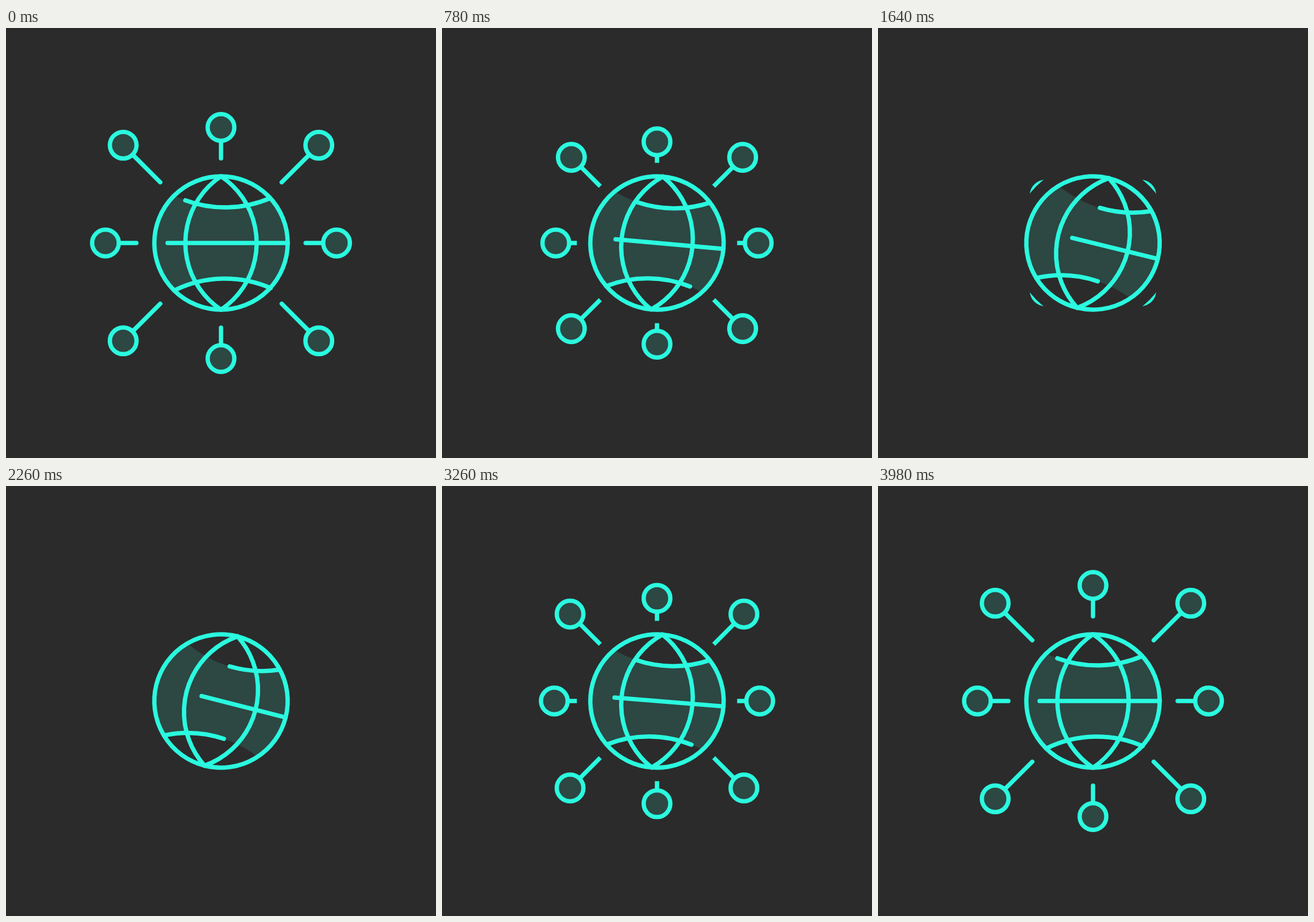
Write an HTML page with a canvas that moves like this. It is 748 px wide and 748 px high and loops after 4 s.

```html
<!DOCTYPE html>
<html lang="en">
<head>
<meta charset="utf-8">
<title>Network globe</title>
<style>
html, body { margin: 0; height: 100%; overflow: hidden; background: #2b2b2b; }
canvas { display: block; }
</style>
</head>
<body>
<canvas width="748" height="748"></canvas>
<script>
const ctx = document.querySelector('canvas').getContext('2d');
const BG = '#2b2b2b', LINE = '#2afadf', FILL = '#2d4743';
const LOOP = 4000, GLOBE = 116, GAP = 139.5, NODE = 23.2;
const rad = deg => deg * Math.PI / 180;

function circle(x, y, r) {
  ctx.beginPath();
  ctx.arc(x, y, r, 0, 7);
}

// Parallels: angles are measured from the arc's middle, positive to the right
const northArc = (right, left) => ctx.arc(7, -262, 200, rad(90 - right), rad(90 - left));
const southArc = (left, right) => ctx.arc(7, 262, 200, rad(left - 90), rad(right - 90));

function stroke(path) {
  ctx.beginPath();
  path();
  ctx.stroke();
}

function segment(x1, x2) {
  stroke(() => {
    ctx.moveTo(x1, 0);
    ctx.lineTo(x2, 0);
  });
}

function drawNodes(u) {
  const pull = u * u * (165 - 22 * u ** 3) / 201;
  ctx.save();
  // Hide everything close to the globe
  ctx.beginPath();
  ctx.rect(-374, -374, 748, 748);
  ctx.arc(0, 0, GAP, 0, 2 * Math.PI);
  ctx.clip('evenodd');
  for (let i = 0; i < 8; i++) {
    const home = i % 2 ? 240.6 : 201;
    const tip = i % 2 ? 149.4 : 147.2;
    const shift = home * pull;
    ctx.save();
    ctx.rotate(i * Math.PI / 4);
    ctx.translate(-shift, 0);
    segment(tip, home - NODE);
    circle(home, 0, NODE);
    ctx.fill();
    ctx.stroke();
    ctx.restore();
  }
  ctx.restore();
}

function drawGlobe(u) {
  const s = u * u * (3 - 2 * u);
  ctx.save();
  ctx.rotate(rad(15 * s));

  ctx.save();
  circle(0, 0, GLOBE);
  ctx.clip();
  ctx.beginPath();
  northArc(40, -40);
  southArc(-40, 40);
  ctx.fill();
  ctx.restore();

  stroke(() => northArc(23.1, -20.2 + 19 * s));
  stroke(() => southArc(-26.2, 23.4 - 20.3 * s));
  segment(-93 + 61 * s, GLOBE);

  const half = Math.asin(GLOBE / 139.5);
  stroke(() => ctx.arc(-77.5, 0, 139.5, -half, half));
  stroke(() => ctx.arc(77.5, 0, 139.5, Math.PI - half, Math.PI + half));
  circle(0, 0, GLOBE);
  ctx.stroke();
  ctx.restore();
}

function draw() {
  const u = 1 - Math.abs(1 - performance.now() % LOOP / (LOOP / 2));
  ctx.setTransform(1, 0, 0, 1, 0, 0);
  ctx.fillStyle = BG;
  ctx.fillRect(0, 0, 748, 748);
  ctx.translate(374, 374);
  ctx.fillStyle = FILL;
  ctx.strokeStyle = LINE;
  ctx.lineWidth = 7.5;
  ctx.lineCap = 'round';
  drawNodes(u);
  drawGlobe(u);
  requestAnimationFrame(draw);
}
draw();
</script>
</body>
</html>
```
